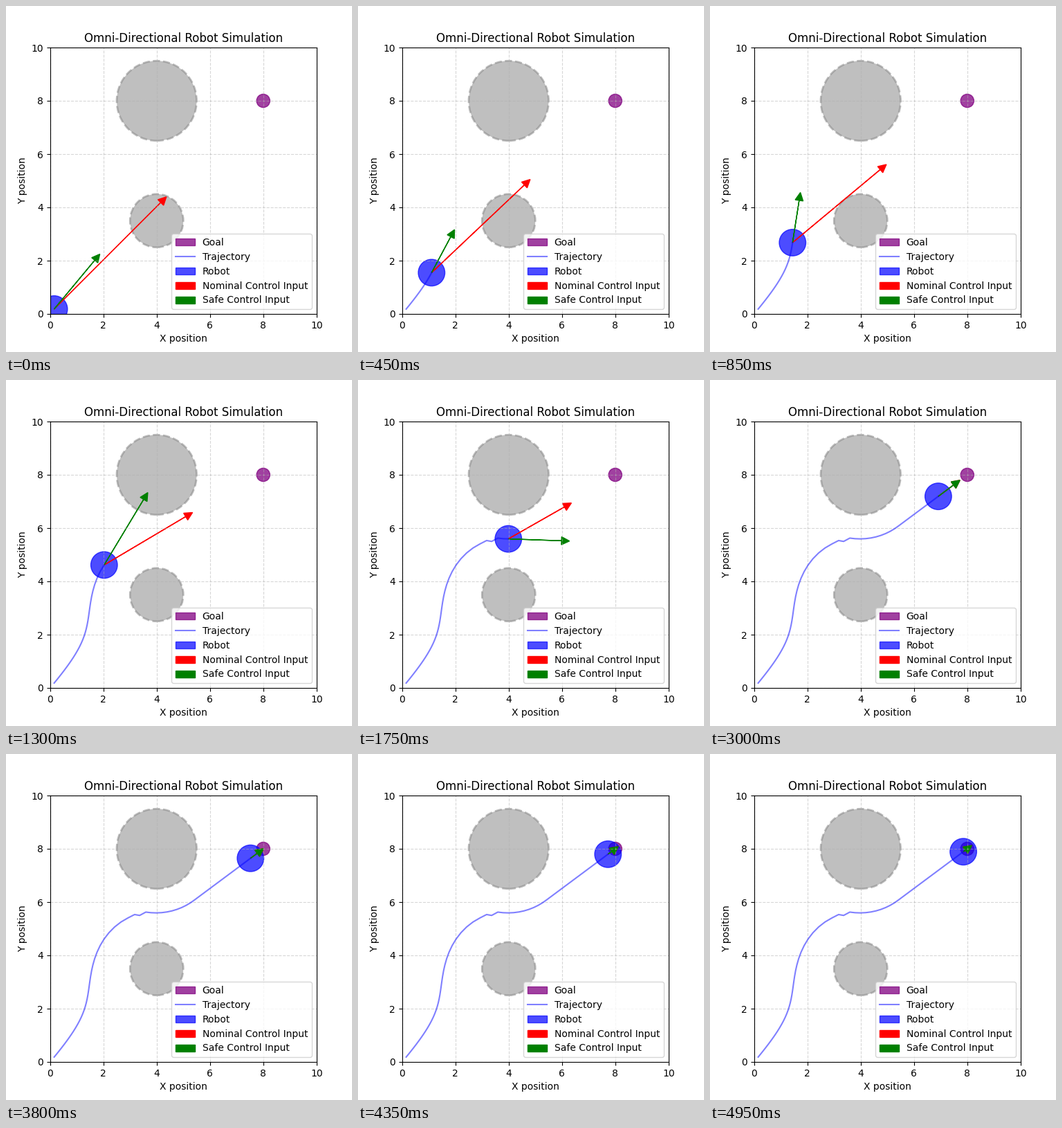
Animation of 500 by 500 pixels, one loop 5 s. Source, as a matplotlib script:

```python
import numpy as np
import matplotlib.pyplot as plt
from matplotlib.animation import FuncAnimation
from matplotlib.patches import Circle

FRAMES = 100
DT = 0.1
GAIN = 0.5
MARGIN = 0.3
ROBOT_R = 0.5
GOAL = np.array([8.0, 8.0])
OBSTACLES = [(np.array([4.0, 8.0]), 1.5), (np.array([4.0, 3.5]), 1.0)]


def barrier(pos, obstacle):
    center, radius = obstacle
    offset = pos - center
    return offset @ offset - (radius + ROBOT_R + MARGIN) ** 2


def safe_control(pos, nominal):
    """Project the nominal control onto the most critical barrier constraint."""
    critical = min(OBSTACLES, key=lambda ob: barrier(pos, ob))
    grad = 2 * (pos - critical[0])
    slack = grad @ nominal + barrier(pos, critical)
    if slack >= 0:
        return nominal
    return nominal - slack * grad / (grad @ grad)


def simulate():
    pos = np.zeros(2)
    path, nominals, safes = [], [], []
    for _ in range(FRAMES):
        nominal = GAIN * (GOAL - pos)
        safe = safe_control(pos, nominal)
        pos = pos + DT * safe
        path.append(pos)
        nominals.append(nominal)
        safes.append(safe)
    return np.array(path), np.array(nominals), np.array(safes)


path, nominals, safes = simulate()

fig, ax = plt.subplots(figsize=(5, 5), dpi=100)
ax.set_xlim(0, 10)
ax.set_ylim(0, 10)
ax.set_aspect("equal")
ax.grid(True, linestyle="--", alpha=0.5)
ax.set_title("Omni-Directional Robot Simulation")
ax.set_xlabel("X position")
ax.set_ylabel("Y position")

for center, radius in OBSTACLES:
    ax.add_patch(Circle(center, radius, color="gray", alpha=0.5,
                        linestyle="--", linewidth=2))
ax.add_patch(Circle(GOAL, 0.25, color="purple", alpha=0.75, label="Goal"))
trail, = ax.plot([], [], "b-", alpha=0.5, label="Trajectory")
robot = ax.add_patch(Circle(path[0], ROBOT_R, color="blue", alpha=0.7,
                            label="Robot"))


def add_arrow(color, label):
    return ax.arrow(0, 0, 1, 1, head_width=0.3, head_length=0.3,
                    fc=color, ec=color, label=label)


nominal_arrow = add_arrow("red", "Nominal Control Input")
safe_arrow = add_arrow("green", "Safe Control Input")
ax.legend(loc="lower right")


def update(frame):
    x, y = path[frame]
    trail.set_data(path[:frame + 1, 0], path[:frame + 1, 1])
    robot.center = x, y
    for arrow, vectors in ((nominal_arrow, nominals), (safe_arrow, safes)):
        dx, dy = vectors[frame]
        arrow.set_data(x=x, y=y, dx=dx, dy=dy)
    return trail, robot, nominal_arrow, safe_arrow


anim = FuncAnimation(fig, update, frames=FRAMES, init_func=lambda: update(0),
                     interval=50, repeat=True, repeat_delay=0)
plt.show()
```
